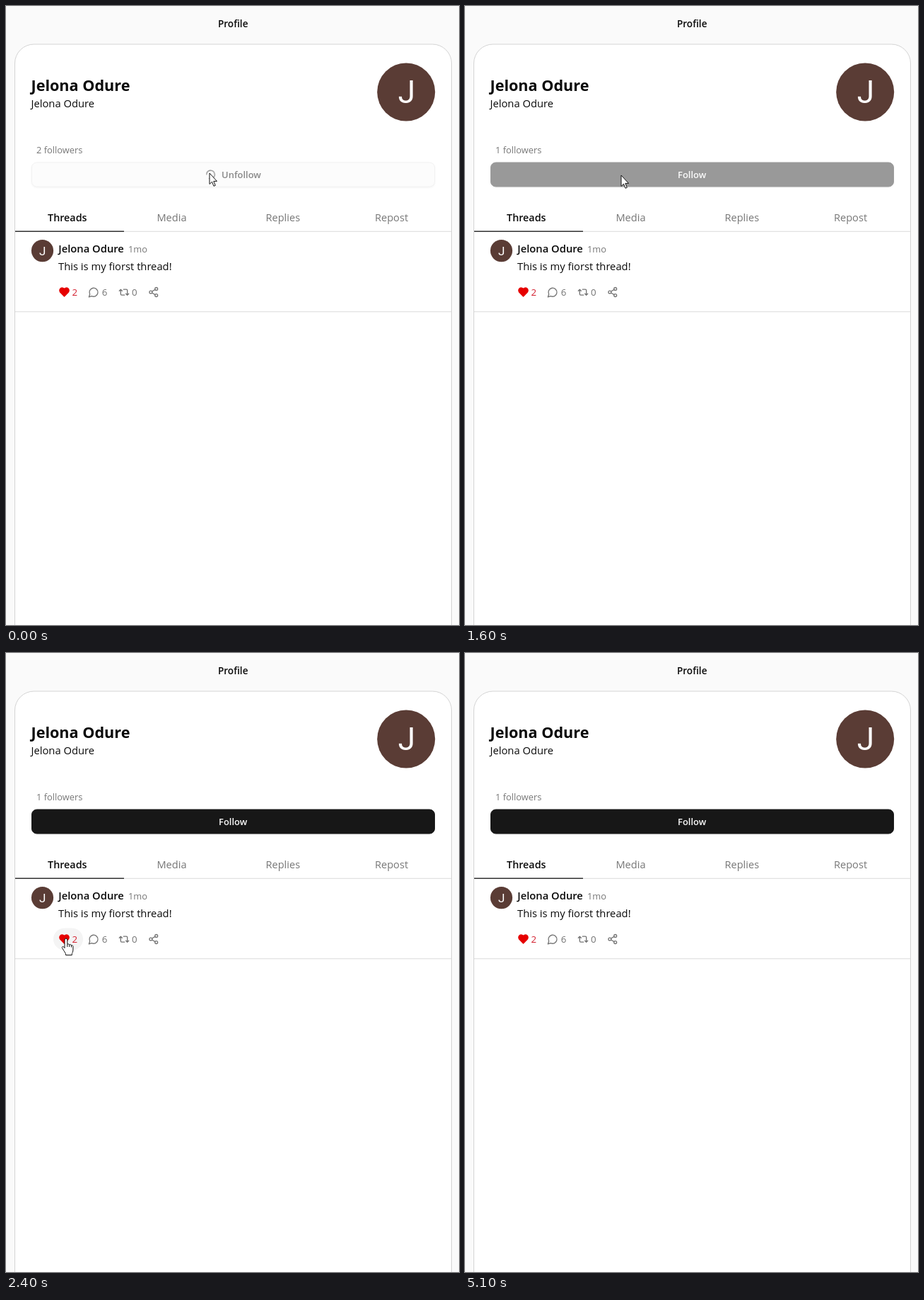
An HTML page for the animation above (5200 ms loop, 641 px wide and 874 px high).

```html
<!DOCTYPE html>
<html lang="en">
<head>
<meta charset="utf-8">
<title>Profile</title>
<style>
  html, body { margin: 0; width: 100%; height: 100%; overflow: hidden; background: #fafafa; }
  svg { display: block; }
  text { font: 14.75px "Open Sans", "Noto Sans", sans-serif; fill: #0a0a0a; }
  .mid { text-anchor: middle; }
  .semi { font-weight: 600; }
  .title { font-size: 13.6px; }
  .name { font-size: 21.6px; font-weight: 700; }
  .tab { font-size: 14.6px; fill: #777; }
  .on { font-size: 14.3px; fill: #0a0a0a; }
  .small { font-size: 12.85px; fill: #777; }
  .count { font-size: 13.3px; fill: #737373; }
  .label { font-size: 12.95px; font-weight: 600; fill: #171717; }
  .initial { font-family: Roboto, sans-serif; fill: #fff; }
  .icon { fill: none; stroke: #737373; stroke-width: 2; stroke-linecap: round; stroke-linejoin: round; }

  /* Everything runs on one 5.2 s clock in 0.1 s ticks. */
  .anim { animation: 5.2s step-end infinite; }
  .box { animation-name: box; filter: drop-shadow(0 1px 1px #0000000d); }
  .busy { animation-name: busy; }
  .unfollow { animation-name: unfollow; }
  .wait { animation-name: wait; }
  .follow { animation-name: follow; }
  .two { animation-name: two; }
  .one { animation-name: one; }
  .hover { animation-name: hover; }
  .arrow { animation-name: arrow; }
  .cursor { animation-name: move; }
  .spin { animation: spin 5.2s steps(52) infinite; }

  @keyframes spin { from { transform: rotate(180deg); } to { transform: rotate(2052deg); } }
  @keyframes box {
    0%, 25% { fill: #fcfcfc; stroke: #f2f2f2; }
    3.846% { fill: #f4f4f4; stroke: #e5e5e5; }
    7.692% { fill: #fafafa; stroke: #e5e5e5; }
    21.153% { fill: #f4f4f4; stroke: #e5e5e5; }
    28.846% { fill: #f0f0f0; stroke: #e5e5e5; }
    30.769% { fill: #999; stroke: #999; }
    32.692% { fill: #424242; stroke: #424242; }
    34.615% { fill: #2e2e2e; stroke: #2e2e2e; }
    38.461%, 100% { fill: #171717; stroke: #171717; }
  }
  @keyframes busy { 0%, 25% { opacity: .5; } 3.846%, 28.846%, 100% { opacity: 0; } }
  @keyframes unfollow { 0%, 25%, 100% { opacity: 0; } 3.846% { opacity: 1; } }
  @keyframes wait { 0%, 30.769%, 100% { opacity: 0; } 28.846% { opacity: .85; } }
  @keyframes follow { 0% { opacity: 0; } 30.769%, 100% { opacity: 1; } }
  @keyframes two { 0% { opacity: 1; } 28.846%, 100% { opacity: 0; } }
  @keyframes one { 0% { opacity: 0; } 28.846%, 100% { opacity: 1; } }
  @keyframes hover { 0%, 50%, 84.615%, 100% { opacity: 0; } 44.23%, 73.076% { opacity: 1; } }
  @keyframes arrow { 0%, 50%, 84.615%, 100% { opacity: 1; } 44.23%, 73.076% { opacity: 0; } }
  @keyframes move {
    0% { transform: translate(288px, 236px); }
    3.846% { transform: translate(288px, 236px); animation-timing-function: steps(5); }
    13.461% { transform: translate(44px, 203px); }
    15.384% { transform: translate(44px, 203px); animation-timing-function: steps(4); }
    23.076% { transform: translate(221px, 239px); }
    34.615% { transform: translate(221px, 239px); animation-timing-function: steps(5); }
    44.23% { transform: translate(85px, 403px); }
    46.153% { transform: translate(85px, 403px); animation-timing-function: steps(6); }
    57.692% { transform: translate(95px, 472px); }
    61.538% { transform: translate(95px, 472px); animation-timing-function: steps(6); }
    73.076% { transform: translate(90px, 412px); }
    82.692% { transform: translate(90px, 412px); animation-timing-function: steps(4); }
    90.384%, 100% { transform: translate(335px, -24px); }
  }
</style>
</head>
<body>
<svg width="641" height="874" viewBox="0 0 641 874">
  <defs>
    <path id="ring" d="M21 12a9 9 0 1 1-6.219-8.56" transform="scale(.65) translate(-12 -12)"/>
  </defs>

  <text class="mid semi title" x="321.2" y="30">Profile</text>
  <rect x="12.5" y="54" width="618" height="860" rx="27" fill="#fff" stroke="#d4d4d4"/>

  <!-- Header -->
  <text class="name" x="35.5" y="120">Jelona Odure</text>
  <text x="35.5" y="143">Jelona Odure</text>
  <circle cx="566.2" cy="121.5" r="41" fill="#5a3c35"/>
  <text class="mid initial" x="567" y="137" style="font-size:44px">J</text>
  <text class="small anim two" x="43" y="208">2 followers</text>
  <text class="small anim one" x="43" y="208">1 followers</text>

  <!-- Button -->
  <rect class="anim box" x="36.5" y="221" width="570" height="34" rx="7"/>
  <g class="anim busy">
    <g transform="translate(289.5 238)"><use href="#ring" class="icon spin" style="stroke:#171717"/></g>
    <text class="mid label" x="333" y="243">Unfollow</text>
  </g>
  <text class="mid label anim unfollow" x="321.2" y="243">Unfollow</text>
  <g class="anim wait">
    <g transform="translate(297 238)"><use href="#ring" class="icon spin" style="stroke:#171717"/></g>
    <text class="mid label" x="332.7" y="243">Follow</text>
  </g>
  <text class="mid label anim follow" x="321.2" y="243" style="fill:#fafafa">Follow</text>

  <!-- Tabs -->
  <path d="M13 318.3H630M13 431.7H630" stroke="#e2e2e2" stroke-width="1.2"/>
  <path d="M13 318.2H167" stroke="#333" stroke-width="1.5"/>
  <text class="mid semi tab on" x="86.8" y="304">Threads</text>
  <text class="mid tab" x="234.5" y="304">Media</text>
  <text class="mid tab" x="391.8" y="304">Replies</text>
  <text class="mid tab" x="545.5" y="304">Repost</text>

  <!-- Post -->
  <circle cx="51.5" cy="345.6" r="15.6" fill="#5a3c35"/>
  <text class="mid initial" x="51.8" y="351.5" style="font-size:17px">J</text>
  <text class="semi" x="74.3" y="348">Jelona Odure</text>
  <text class="small" x="173" y="348">1mo</text>
  <text x="74" y="373">This is my fiorst thread!</text>

  <rect class="anim hover" x="67" y="388.5" width="42" height="31" rx="15.5" fill="#f4f4f4"/>
  <g class="icon">
    <path transform="translate(74.5 396) scale(.667)" style="fill:#e60000;stroke:#e60000"
      d="M19 14c1.49-1.46 3-3.21 3-5.5A5.5 5.5 0 0 0 16.5 3c-1.76 0-3 .5-4.5 2-1.5-1.5-2.74-2-4.5-2A5.5 5.5 0 0 0 2 8.5c0 2.3 1.5 4.05 3 5.5l7 7Z"/>
    <path transform="translate(116 396.2) scale(.667)" d="M7.9 20A9 9 0 1 0 4 16.1L2 22Z"/>
    <path transform="translate(159 396.2) scale(.667)"
      d="m2 9 3-3 3 3M13 18H7a2 2 0 0 1-2-2V6M22 15l-3 3-3-3M11 6h6a2 2 0 0 1 2 2v10"/>
    <g transform="translate(201 396.2) scale(.65)">
      <circle cx="18" cy="5" r="3"/><circle cx="6" cy="12" r="3"/><circle cx="18" cy="19" r="3"/>
      <path d="M8.6 13.5l6.8 4M15.4 6.5l-6.8 4"/>
    </g>
  </g>
  <text class="count" x="93.6" y="409" style="fill:#d3202f">2</text>
  <text class="count" x="135.8" y="409">6</text>
  <text class="count" x="178" y="409">0</text>

  <!-- Pointer -->
  <g class="anim cursor" fill="#fff" stroke="#111" stroke-linejoin="round">
    <path class="anim arrow" d="M0 0V15.5L3.5 12.2 6 18.3 8.3 17.3 5.8 11.4H10.5Z"/>
    <g class="anim hover">
      <path d="M-2 2a1.9 1.9 0 0 1 3.8 0V8.5a1.7 1.7 0 0 1 2.9.6 1.7 1.7 0 0 1 2.8.8 1.6 1.6 0 0 1 2.4 1.4V16c0 3-1.2 4.5-1.6 5.5V23.5H-.5V21.5C-2 19-4 16-5.5 13.5c-.8-1.6 1-2.7 2.2-1.5L-2 13.5Z"/>
      <path d="M1.8 8.5V12M4.7 9.1V12M7.5 9.9V12.5" fill="none"/>
    </g>
  </g>
</svg>
</body>
</html>
```
